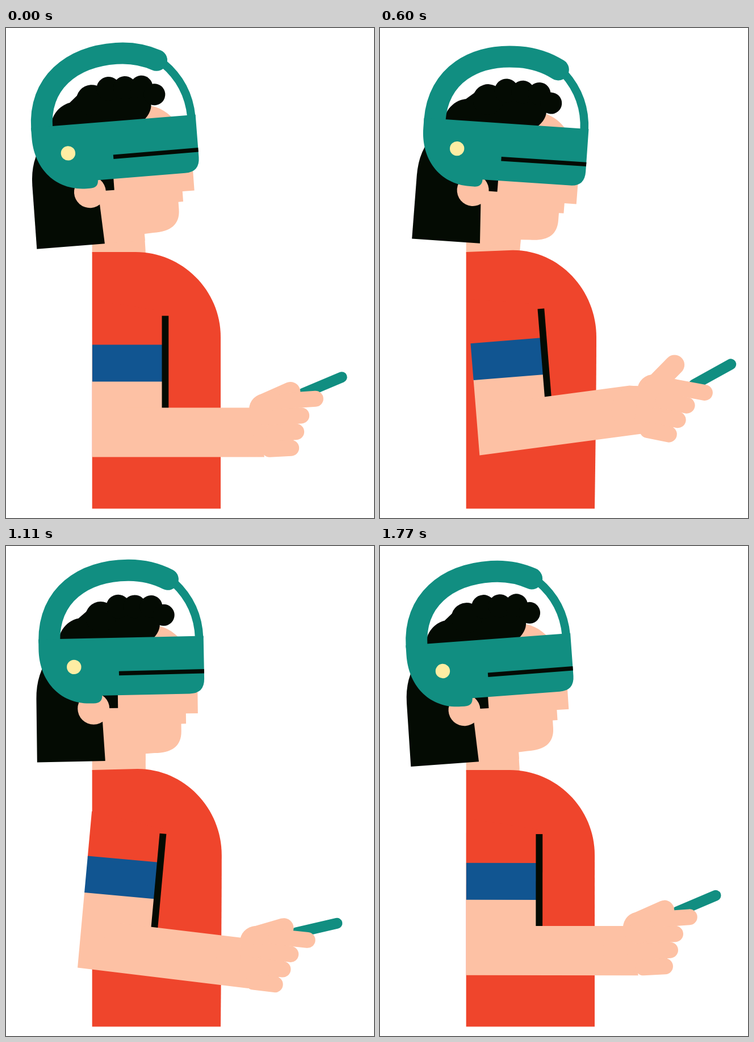
These frames come from a looping animation (648x864 px, 1.8 s). An HTML page with a canvas:

```html
<!DOCTYPE html>
<html lang="en">
<head>
<meta charset="utf-8">
<title>Headset player</title>
<style>
html, body { margin: 0; width: 100%; height: 100%; overflow: hidden; background: #fff; }
canvas { display: block; width: 648px; height: 864px; }
</style>
</head>
<body>
<canvas id="stage"></canvas>
<script>
const W = 648, H = 864, LOOP = 1800, STEP = 30;
const TEAL = '#118e81', SKIN = '#fdc1a4', RED = '#ef452c', INK = '#040b03',
      BLUE = '#115591', CREAM = '#ffeda3';
const canvas = document.getElementById('stage');
const g = canvas.getContext('2d');
const dpr = window.devicePixelRatio || 1;
canvas.width = W * dpr;
canvas.height = H * dpr;

// Key poses in degrees; a joint missing from a pose eases straight past it.
const poses = [
  { at: 0, head: -4.6, upper: 0, fore: 0, hand: 0, thumb: -24, phone: -23, slip: 0 },
  { at: 225, head: -8.1 },
  { at: 390, head: -3.1, upper: 0.8, fore: 1.5, hand: 1.5, thumb: -49, phone: -43.5 },
  { at: 510, upper: 1.2, fore: 2, hand: 0 },
  { at: 600, head: 3.9, upper: -4.6, fore: -7.6, hand: 14.5, thumb: -60, phone: -43.5 },
  { at: 840, head: -5.6, upper: -7.2, fore: -13, hand: -31.6, thumb: -65, phone: -44, slip: 0 },
  { at: 930, head: -9 },
  { at: 1110, head: -1.2, upper: 5.2, fore: 6.9, hand: 9.9, thumb: -26, phone: -23, slip: -2.8 },
  { at: 1350, head: -0.5, upper: 4.1, fore: 5.2, hand: 5.3, thumb: -26.5, phone: -24, slip: 0 }
];

// Smooth periodic curve through a joint's keys, without overshoot.
function track(joint) {
  const keys = poses.filter(p => joint in p), n = keys.length;
  const key = i => {
    const lap = Math.floor(i / n), k = keys[i - lap * n];
    return [k.at + lap * LOOP, k[joint]];
  };
  const slope = i => {
    const a = key(i), b = key(i + 1);
    return (b[1] - a[1]) / (b[0] - a[0]);
  };
  const tangent = i => {
    const p = slope(i - 1), q = slope(i);
    return p * q <= 0 ? 0 : 2 * p * q / (p + q);
  };
  return t => {
    let i = n - 1;
    while (i > 0 && keys[i].at > t) i--;
    const [t0, v0] = key(i), [t1, v1] = key(i + 1);
    const d = t1 - t0, s = (t - t0) / d, r = 1 - s;
    return v0 * (1 + 2 * s) * r * r + tangent(i) * d * s * r * r
         + v1 * s * s * (3 - 2 * s) - tangent(i + 1) * d * s * s * r;
  };
}

const joints = ['head', 'upper', 'fore', 'hand', 'thumb', 'phone', 'slip'];
const tracks = joints.map(j => [j, track(j)]);
const poseAt = t => Object.fromEntries(tracks.map(([j, f]) => [j, f(t)]));

// Two breaths per loop; the arm rises a little ahead of the chest.
const breath = t => (1 - Math.cos(4 * Math.PI * t / LOOP)) / 2;
const rad = deg => deg * Math.PI / 180;

function turn(x, y, deg, dy = 0) {
  g.translate(x, y + dy);
  g.rotate(rad(deg));
  g.translate(-x, -y);
}
function shape(d, color) {
  g.fillStyle = color;
  g.fill(new Path2D(d));
}
function stroke(d, color, width, cap = 'round') {
  g.strokeStyle = color;
  g.lineWidth = width;
  g.lineCap = cap;
  g.stroke(new Path2D(d));
}
function disc(x, y, r, color) {
  g.fillStyle = color;
  g.beginPath();
  g.arc(x, y, r, 0, Math.PI * 2);
  g.fill();
}
function limb(x, y, length, deg, r, color) {
  const a = rad(deg);
  stroke(`M${x} ${y}L${x + length * Math.cos(a)} ${y + length * Math.sin(a)}`, color, 2 * r);
}

function torso(air) {
  const top = 395 - 4.5 * air, x = 228 + 8 * air, side = 378 + 4 * air;
  shape(`M151.700 395L${x} ${top}C${x + 82} ${top} ${side} 462 ${side} 545
    Q${side} 640 378 847.500L151.700 847.500Z`, RED);
}

function neck(deg, dy) {
  const a = rad(deg), c = Math.cos(a), s = Math.sin(a);
  const x = 147 + 99 * c + 35.5 * s, y = 389.5 + dy + 99 * s - 35.5 * c;
  shape(`M151.700 398L151.700 335L${x} ${y}L246 398Z`, SKIN);
}

function head(deg, dy, slip) {
  g.save();
  turn(147, 389.5, deg, dy);
  shape('M80 190Q55 220 55 265L55 377L175 376L185 200Z', INK);
  shape(`M165 170L245 137C275 135 296 146 312 166L339 200L339 294L318 294L318 312L309.5 312
    L309.5 325C309.5 352 292 363 262 363L246 364L246 376L175 376L171 305Z`, SKIN);
  shape('M165 250L198.500 250L198.500 283L165 283Z', INK);
  disc(155.5, 283.5, 28, SKIN);
  hair();
  g.translate(0, slip);
  headset();
  g.restore();
}

function hair() {
  shape(`M97 168L112 140L150 108L200 100L265 104L274 136Q274 153 254 168Z
    M95 168A45 45 0 0 1 185 168Z`, INK);
  disc(170, 122, 27, INK);
  for (let i = 0; i < 3; i++) disc(201 + 29 * i, 104 + i / 2, 21 - i / 2, INK);
  disc(281, 120, 19, INK);
}

function headset() {
  stroke('M300 66C327 92 342 125 343 164', TEAL, 14.5, 'butt');
  stroke('M79 166C79 85 140 43 219 43C246 43 270 50 289 60', TEAL, 38);
  shape(`M60 163L350.500 160.500L351 236Q351 262 325 262L171 263.500Q171 277 156 277L150 277
    C95 277 60 235 60 180Z`, TEAL);
  stroke('M201 224.500L351 222.700', INK, 7.5, 'butt');
  disc(122, 212.5, 12.7, CREAM);
}

function hand(thumb, phone) {
  limb(523, 645, 74, phone, 9.5, TEAL);
  shape('M440 750L502 754L516 668L490 644L457 650L430 674Z', SKIN);
  disc(456, 673, 28, SKIN);
  limb(457, 661.5, 48, thumb, 17.5, SKIN);
  limb(490, 658, 55, -4, 14, SKIN);
  for (let i = 0; i < 3; i++) limb(478 - 7 * i, 686 + 28.5 * i, 42 - 2 * i, -3, 14.2, SKIN);
}

function arm(p, lift) {
  const bend = p.hand - p.fore;
  g.save();
  turn(204, 468, p.upper, lift);
  shape('M152 480L280 500L280 562L152 562Z', RED);
  shape('M152 622L280 622L284 672L220 692L152 757Z', SKIN);
  shape('M152 559L280 559L280 624L152 624Z', BLUE);
  shape('M274.500 508L286.300 508L286.300 675L274.500 675Z', INK);
  turn(152, 757, p.fore - p.upper);
  shape('M152 757L455 757L440 672L430 670L212 670Z', SKIN);
  disc(435, 714, 42.5, SKIN);
  // The wrist sinks as the hand tips back
  turn(435, 715, bend, Math.max(0, -bend / 1.9));
  hand(p.thumb, p.phone);
  g.restore();
}

function draw(t) {
  g.setTransform(dpr, 0, 0, dpr, 0, 0);
  g.fillStyle = '#fff';
  g.fillRect(0, 0, W, H);
  const p = poseAt(t), air = breath(t);
  const tilt = p.head + 0.5, drop = 6.1 * (1 - air);
  neck(tilt, drop);
  torso(air);
  head(tilt, drop, p.slip);
  arm(p, -11.8 * breath(t + 55));
}

let start = null;
function tick(now) {
  if (start === null) start = now;
  draw(Math.floor(((now - start) % LOOP) / STEP) * STEP);
  requestAnimationFrame(tick);
}
draw(0);
requestAnimationFrame(tick);
</script>
</body>
</html>
```
